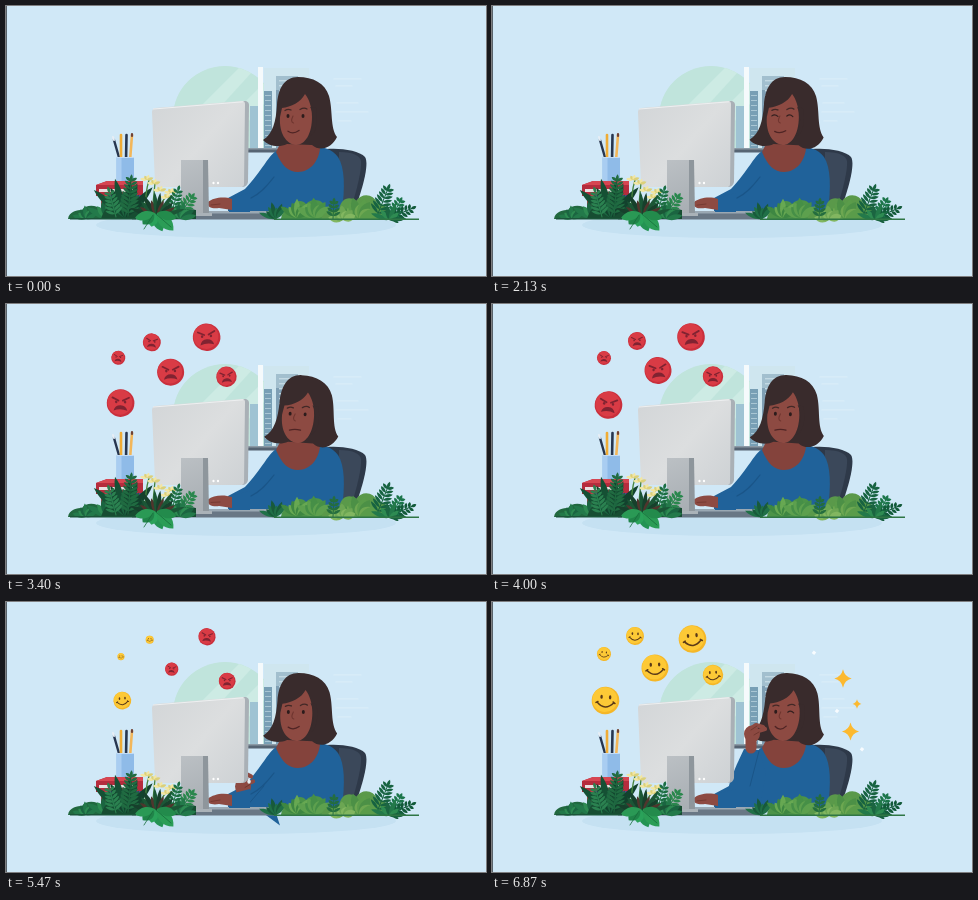
An HTML page with a canvas for the animation above (6.94 s loop, 480 px wide and 270 px high).

```html
<!DOCTYPE html>
<html lang="en">
<head>
<meta charset="utf-8">
<title>Desk moods</title>
<style>
html, body { margin: 0; width: 100%; height: 100%; overflow: hidden; background: #d0e8f7; }
canvas { display: block; }
</style>
</head>
<body>
<canvas id="stage" width="480" height="270"></canvas>
<script>
const c = document.getElementById('stage').getContext('2d');
const LOOP = 6940, FRAMES = 104;
const SKIN = '#8d4a42', HAIR = '#392b2c', BLUE = '#20629a';

const clamp = v => Math.max(0, Math.min(1, v));
const ease = v => v * v * (3 - 2 * v);
const ramp = (t, a, b) => ease(clamp((t - a) / (b - a)));
const pop = (t, a, d) => {
  const p = clamp((t - a) / d) - 1;
  return 1 + 2.7 * p ** 3 + 1.7 * p * p;
};
// Eased value through evenly read [times] and [values]
function track(t, times, values) {
  let i = 0;
  while (i < times.length - 2 && t > times[i + 1]) i++;
  return values[i] + (values[i + 1] - values[i]) * ramp(t, times[i], times[i + 1]);
}

function fill(d, color) { c.fillStyle = color; c.fill(new Path2D(d)); }
function line(d, color, width = 1) {
  c.strokeStyle = color; c.lineWidth = width;
  c.lineCap = c.lineJoin = 'round';
  c.stroke(new Path2D(d));
}
function oval(x, y, rx, ry, color) {
  c.fillStyle = color;
  c.beginPath(); c.ellipse(x, y, rx, ry, 0, 0, 7); c.fill();
}
function box(x, y, w, h, color) { c.fillStyle = color; c.fillRect(x, y, w, h); }
function at(x, y, angle, scale, draw) {
  c.save(); c.translate(x, y); c.rotate(angle); c.scale(scale, scale);
  draw(); c.restore();
}
function shade(x0, y0, x1, y1, ...colors) {
  const g = c.createLinearGradient(x0, y0, x1, y1);
  colors.forEach((k, i) => g.addColorStop(i / (colors.length - 1), k));
  return g;
}

// Plants: angles are in degrees from straight up
function leaf(x, y, deg, len, w, color) {
  at(x, y, deg * Math.PI / 180, 1, () =>
    fill(`M0 0C${-w} ${-len * .3} ${-w} ${-len * .7} 0 ${-len}C${w} ${-len * .7} ${w} ${-len * .3} 0 0`, color));
}
function fan(x, y, n, from, to, len, w, colors) {
  for (let i = 0; i < n; i++) {
    const k = i / (n - 1);
    leaf(x, y, from + (to - from) * k, len * (.82 + .18 * Math.cos(i * 2.3)), w, colors[i % colors.length]);
  }
}
function fern(x, y, deg, len, size, color) {
  at(x, y, deg * Math.PI / 180, 1, () => {
    line(`M0 0V${-len}`, color, 1);
    for (let s = 3; s < len; s += 4) {
      const l = size * (1 - .5 * s / len);
      leaf(0, -s, -58, l, 2, color);
      leaf(0, -s, 58, l, 2, color);
    }
    leaf(0, -len + 2, 0, size * .6, 2, color);
  });
}

function backdrop() {
  box(0, 0, 480, 270, '#d0e8f7');
  oval(240, 219, 150, 13, '#c5e1f2');
  c.save();
  c.beginPath(); c.ellipse(219, 111, 52, 51, 0, 0, 7); c.clip();
  box(160, 55, 98, 90, '#c0e4dc');
  fill('M150 145L240 55H256L174 145ZM190 145L258 77V98L216 145Z', '#cdebe4');
  c.restore();
  box(258, 62, 45, 80, '#cfe6ef');
  box(244, 100, 8, 42, '#9fc3d3');
  box(258, 85, 8, 57, '#789fb5');
  box(270, 70, 22, 72, '#a2bfce');
  box(270, 84, 9, 58, '#7f9fb4');
  for (let y = 74; y < 140; y += 5) {
    box(273, y, 16, 1.4, '#c3d9e3');
    if (y > 88) box(259, y, 6, 1, '#a9c6d4');
  }
  line('M328 73H355M330 80H346M331 97H352M330 106H362M332 115H345', '#dceef8');
  box(252, 61, 5, 82, '#f5fafc');
  box(242, 142, 36, 4.5, '#566473');
  box(242, 142, 36, 1.5, '#8b9aa6');
}

function supplies() {
  line('M108 134L114 155', '#27364f', 2.4);
  line('M107 131L108 134', '#e7eef5', 2);
  line('M115 129V155', '#efac36', 2.6);
  line('M120.5 129L120 155', '#27364f', 2.6);
  line('M126 129L124 155', '#f2b65a', 2.6);
  line('M126 128V130', '#6f4134', 2.2);
  box(110.5, 151, 17.5, 25, '#8fbbe8');
  box(110.5, 151, 5, 25, '#a9cdf1');
  line('M111 151.5H127.5', '#c3dcf5');
  fill('M90 179L101 175H137V190H90Z', '#b52c3d');
  fill('M90 179L101 175H137V179Z', '#d64652');
  box(93, 183, 37, 3, '#e9dfe1');
  fill('M95 189H137V205H95Z', '#57408f');
  box(95, 189, 8, 16, '#c83d47');
}

function body() {
  fill('M314 144C327 141 352 143 359 151C364 158 355 188 348 205H320Z', '#2e3949');
  fill('M333 146C348 146 354 150 355 155C356 165 349 190 345 202H333Z', '#3b485a');
  fill('M273 143C262 149 257 164 239 183L222 192V206H336C339 181 339 162 332 151C326 143 317 141 311 141Z', BLUE);
  line('M268 171C261 180 255 187 245 192', '#1a5588', 1.2);
  fill('M270 146C276 160 282 166 292 166C304 166 313 155 314 142L304 128L278 130Z', '#84433c');
}

function head(t) {
  const keys = [0, 1270, 2200, 2870, 4000, 4870, 5500, 6000, 6870];
  const tilt = track(t, keys, [0, .012, .01, .05, .025, 0, .01, .055, .035]);
  const dx = track(t, keys, [0, .5, .5, 1, .5, -.3, 0, .7, .5]);
  const mood = track(t, keys, [2, 2, 1.5, -.8, -1, 1.8, 2, 3, 3]);
  const sad = ramp(t, 2500, 2800) * (1 - ramp(t, 3200, 3450));
  const wink = ramp(t, 5650, 5850);
  const blink = [900, 2050, 4350, 5250].some(b => t > b && t < b + 130);
  c.save();
  c.translate(290 + dx, 145); c.rotate(tilt); c.translate(-290, -145);
  fill('M292 71C278 71 272 83 271 99C270 115 267 128 257 134C262 140 273 142 281 138L306 139C314 146 326 142 331 131C324 122 327 104 323 90C319 77 307 71 292 71Z', HAIR);
  fill('M276 102C285 101 295 96 299 88C303 93 306 101 306 111C306 128 299 139 290 139C280 138 273 127 274 111Z', SKIN);
  fill('M304 101C308 107 309 119 303 130C309 130 313 118 310 102Z', HAIR);
  line('M279 104.5Q282 102.5 285 104', '#422927', 1.3);
  line('M294 103.5Q298 101 301 103', '#422927', 1.3);
  const eye = (x, shut) => {
    if (shut > .5) line(`M${x - 3} 110Q${x} 107.5 ${x + 3} 110.5`, '#33201f', 1.2);
    else oval(x, 110, 1.5, 2 - sad * 1.1, '#2c1c1c');
  };
  eye(282, +blink);
  eye(297, Math.max(+blink, wink));
  if (sad > .3) line('M279 108.7H285M294 108.7H300', '#4b2a28');
  line('M287 110Q284 116 287.5 117', '#6f352f', 1.1);
  line(`M282 ${126 - mood * .4}Q287 ${126 + mood * 1.4} 293 ${125.5 - mood * .5}`, '#4f2424', 1.3);
  c.restore();
}

function raisedArm(t) {
  const up = ramp(t, 5400, 5850), lean = ramp(t, 6050, 6500);
  if (!up) return;
  const x = 237 + 15 * up + 9 * lean, y = 187 - 52 * up - 4 * lean;
  const wx = x - 3 + lean, wy = y + 16;
  fill(`M${wx - 7} ${wy}L${wx + 8} ${wy + 1}L274 ${wy + 24}L268 205H235C233 193 237 178 ${wx - 7} ${wy}Z`, BLUE);
  line(`M${wx + 8} ${wy + 2}L258 184`, '#1a5588', 1);
  line(`M${wx} ${wy - 1}L${x - 2} ${y + 6}`, SKIN, 11);
  oval(x - 1, y + 1, 8, 8.5, SKIN);
  const reach = 9 + lean * 3;
  line(`M${x - 4} ${y - 3}L${x + 3} ${y - 11 + lean * 3}L${x + reach - 2} ${y - 9 + lean * 3}M${x + 2} ${y - 1}L${x + reach} ${y - 4}`, SKIN, 4.2);
  line(`M${x - 2} ${y - 3}L${x + 4} ${y - 7}M${x + 1} ${y + 2}L${x + 6} ${y - 1}`, '#70372f', 1);
  if (lean < .5) oval(x + 5, y - 4, 1.7, 2.2, '#e7eff4');
}

function desk(t) {
  box(126, 205, 144, 8.5, '#697785');
  box(188, 205, 82, 2.5, '#9aa8b3');
  const tap = Math.sin(t / 95) * .6;
  fill('M224 192L244 187V206H223Z', BLUE);
  fill(`M226 193C217 190 207 ${192 + tap} 202 ${196 + tap}C200 ${202 + tap} 208 203 213 202L226 204Z`, SKIN);
  line(`M205 ${199 + tap}L214 198`, '#70372f', .8);
}

function monitor() {
  fill('M236 95L240 95Q243 96 243 99L242 176Q241 181 236 181Z', '#a9b0b6');
  fill('M149 102L236 95Q239 95 239 98L238 178Q238 181 235 181H152Q149 181 149 178L146 106Q146 103 149 102Z',
    shade(148, 100, 240, 180, '#d3d6d8', '#dcdedf', '#cdd1d4'));
  line('M147.5 103L237 95.8', '#eef0f1');
  fill('M196 154H202L203 209H196Z', '#8e969c');
  fill('M175 154H197V209H175Z', shade(175, 154, 198, 209, '#bbc0c4', '#a7adb2'));
  box(170, 207, 36, 3, '#aab2b8');
  oval(207.5, 177, 1.1, 1.3, '#fff');
  oval(212, 177, 1.1, 1.3, '#fff');
}

function plants() {
  const dark = ['#155034', '#1d6440', '#12422d'], mid = ['#23794a', '#2e8b52', '#1b6541'];
  // left bed
  fill('M62 213C63 205 72 204 76 204C80 198 90 199 96 203L110 213Z', '#21683f');
  fan(80, 213, 7, -75, 65, 14, 3, mid);
  fan(101, 213, 6, -60, 50, 23, 4, mid);
  fill('M95 213C100 196 112 190 132 196L190 204V213Z', '#174d32');
  fan(119, 212, 9, -48, 42, 42, 5, dark);
  fern(122, 210, 5, 36, 13, '#206b41');
  fern(110, 211, -15, 27, 11, '#2b8150');
  line('M139 208Q139 187 143 174M146 208L149 177M150 208Q155 195 165 185', '#47843e', 1.3);
  for (const [x, y] of [[141, 172], [148, 176], [154, 183], [165, 185], [161, 190]])
    fan(x, y + 2, 4, -80, 70, 7, 2, ['#f2e6a3', '#dcd078']);
  fern(172, 211, 35, 24, 12, '#2a874d');
  fern(165, 209, 16, 27, 10, '#1c6e42');
  fan(174, 213, 7, -50, 78, 19, 3.5, mid);
  fan(151, 212, 12, -70, 72, 29, 3, ['#17402c', '#50352d', '#1b5636']);
  fan(148, 207, 3, 155, 225, 20, 7, ['#249353', '#2aa25a', '#208449']);
  leaf(151, 207, 137, 24, 8, '#2b9d56');
  leaf(151, 207, 105, 20, 6, '#238b4c');
  leaf(149, 207, 255, 21, 6, '#2a9955');
  line('M150 208L165 221M147 209L138 223', '#176e3c', .8);
  // right bed
  fan(270, 213, 7, -70, 40, 18, 3, ['#207047', '#185a3a']);
  fill('M275 213C276 204 283 203 285 204C285 195 296 192 300 198C306 191 318 194 319 201L330 213Z', '#4c9348');
  fan(291, 212, 7, -55, 55, 20, 4, ['#3e8742', '#67a852']);
  fan(309, 212, 7, -60, 52, 21, 5, ['#5da04e', '#468f47']);
  fill('M315 214C317 204 328 204 333 205C334 191 345 190 350 195C356 186 368 188 371 197C379 197 386 206 387 214Z', '#5a994a');
  fan(353, 213, 9, -65, 65, 23, 6, ['#4c9046', '#6da751', '#5a9c4a']);
  fan(337, 214, 7, -80, 70, 15, 5, ['#82b660', '#6ca653']);
  fern(327, 213, 3, 18, 9, '#246d3e');
  fern(371, 210, 22, 29, 13, '#176341');
  fern(385, 213, 27, 20, 11, '#1b754a');
  fern(382, 213, 66, 27, 10, '#125a39');
  fan(383, 214, 6, -70, 85, 19, 3, mid);
  box(64, 212, 66, 1.5, '#1b553a');
  box(268, 212.5, 145, 1.5, '#2f7645');
}

function face(happy) {
  oval(0, 0, 10, 10, happy ? '#f5b727' : '#c92f3c');
  oval(-.5, -.6, 9, 9, happy ? '#fdc936' : '#d93b45');
  const ink = happy ? '#5b3a18' : '#802331';
  if (happy) {
    oval(-3, -2.5, .9, 1.5, ink);
    oval(3.2, -2.5, .9, 1.5, ink);
    line('M-6 1.5Q0 8 6.2 1.2M-6.8 1.8L-5.4 1M5.6 .8L7 1.8', ink, 1.1);
  } else {
    line('M-6 -4L-1.6 -1.8M6 -4L1.6 -1.8', ink, 1.3);
    oval(-3.2, -.8, .9, 1, ink);
    oval(3.2, -.8, .9, 1, ink);
    fill('M-5 5.5Q-4 1.5 0 1.5Q4 1.5 5 5.5Q0 3.5 -5 5.5', ink);
  }
}

// radius, then x and y at each of the stops
const STOPS = [2870, 4000, 4870, 6000, 6870];
const FACES = [
  [13.8, [113, 116.5, 118, 115, 113.5], [97.5, 101, 98, 99, 98.5]],
  [7, [112.5, 112, 115, 115, 112], [53.5, 54, 55.5, 54, 52]],
  [9, [146.5, 145, 147, 141, 143], [39.5, 37, 38.5, 37, 34]],
  [13.5, [163.5, 166, 169, 163, 163], [69.5, 66.5, 68.5, 66, 66]],
  [13.8, [202, 199, 201, 201, 200.5], [33.5, 33, 32, 37, 37]],
  [10.2, [220, 221, 219, 223, 221], [73, 72.5, 78, 80, 73]]
];

function faces(t) {
  FACES.forEach(([r, xs, ys], i) => {
    const start = 2330 + i * 30;
    if (t < start) return;
    const out = ramp(t, start, start + 380);
    const x = 195 + (track(t, STOPS, xs) - 195) * out;
    const y = 115 + (track(t, STOPS, ys) - 115) * out;
    const turn = 5400 + i * 35;
    const swell = 1 + .13 * out * (1 - ramp(t, 2880, 3200));
    const flip = 1 - .55 * Math.sin(Math.PI * clamp((t - turn + 130) / 260));
    at(x, y, Math.sin(t / 520 + i) * .1, r / 10 * Math.max(0, out) * swell * flip, () => face(t > turn));
  });
}

function sparkles(t) {
  const star = (x, y, r, i) => {
    const s = pop(t, 5560 + i * 60, 300) * r * (1 + .13 * Math.sin((t - 6000) / 190 + i * 2));
    if (t > 5560 + i * 60) at(x, y, 0, Math.max(0, s), () =>
      fill('M0 -1Q.18 -.18 .95 0Q.18 .18 0 1Q-.18 .18 -.95 0Q-.18 -.18 0 -1', '#fcb92f'));
  };
  star(351, 76.5, 10.5, 0);
  star(365, 102, 4.5, 1);
  star(358.5, 129.5, 8.2, 2);
  [[322, 51.5], [345, 110], [370, 147.5]].forEach(([x, y], i) => {
    const p = ramp(t, 5620 + i * 60, 5850 + i * 60);
    if (p) at(x, y + Math.sin(t / 300 + i), .7, p, () => box(-1.6, -1.6, 3.2, 3.2, '#f8fcff'));
  });
}

function draw(now) {
  const t = Math.floor(now % LOOP / LOOP * FRAMES + .05) * LOOP / FRAMES;
  backdrop();
  supplies();
  faces(t);
  body();
  head(t);
  raisedArm(t);
  desk(t);
  monitor();
  plants();
  sparkles(t);
  box(0, 0, 1, 270, '#59636b');
  requestAnimationFrame(loop);
}
const begin = performance.now();
function loop() { draw(performance.now() - begin); }
loop();
</script>
</body>
</html>
```
